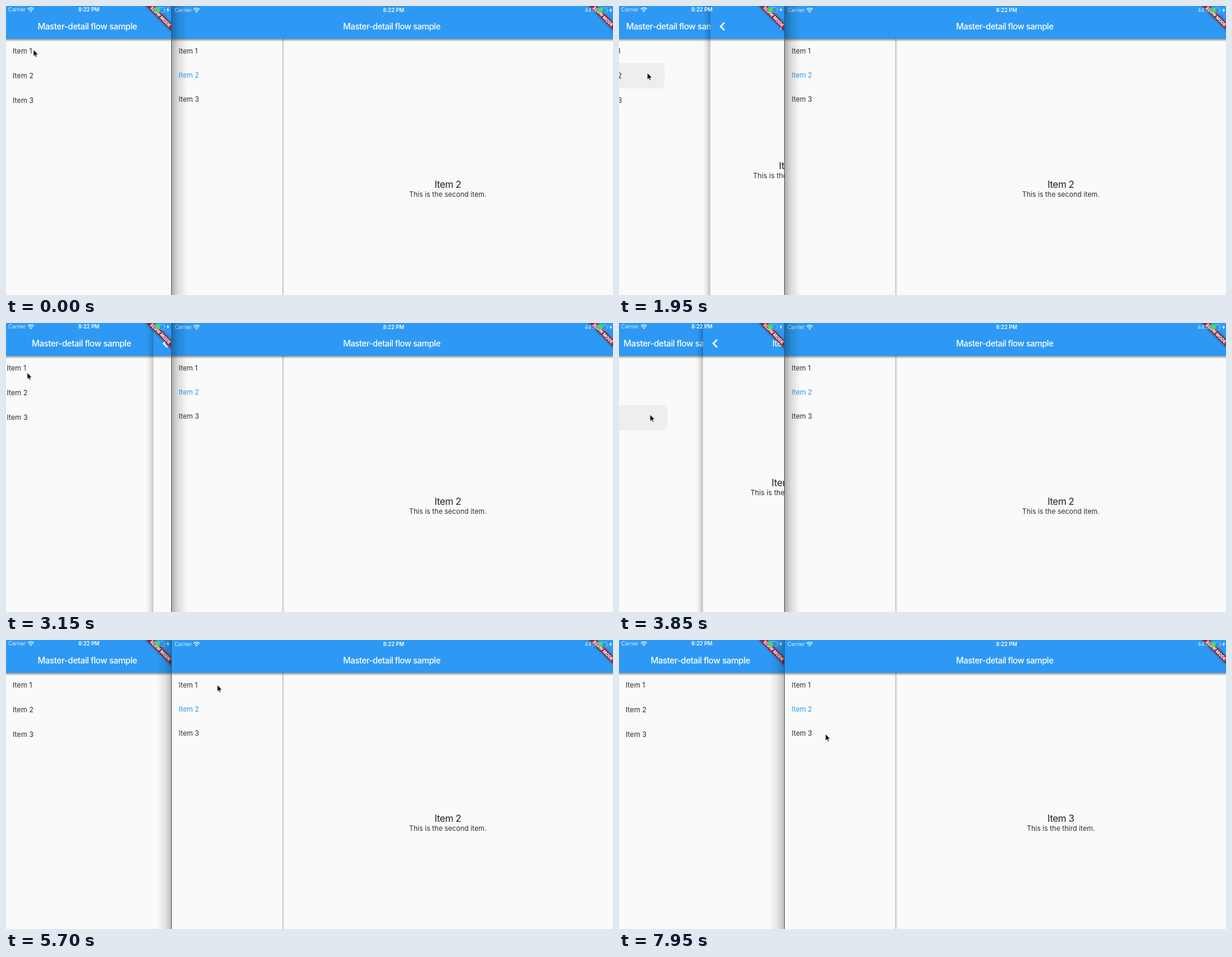
An HTML page that plays this animation: 1007 by 480 pixels, repeating every 8000 ms.

```html
<!DOCTYPE html>
<html lang="en">
<head>
<meta charset="utf-8">
<title>Master-detail flow sample</title>
<style>
@property --push { syntax: "<number>"; inherits: true; initial-value: 0; }

html, body { margin: 0; width: 100%; height: 100%; overflow: hidden; background: #fafafa; }
body > svg { display: block; width: 1007px; height: 480px; font-family: Inter, Roboto, sans-serif; }

.bg { fill: #fafafa; }
.bar { fill: #2d99f4; }
.row, .body { font-size: 11.7px; letter-spacing: .03px; fill: #2e2e2e; }
.head { font-size: 16.2px; letter-spacing: -.4px; fill: #242424; }
.title { font-size: 14.2px; font-weight: 500; letter-spacing: -.44px; fill: #fff; }
.head, .body, .title, .clock, .band text { text-anchor: middle; }
.tablet .row, .tablet .body { font-size: 11.42px; }
.tablet .head { font-size: 15.8px; }
.tablet .title { font-size: 13.9px; }
.status { font-size: 8.7px; fill: #e3f1fe; }
.clock { font-size: 8.7px; font-weight: 600; fill: #fff; }
.band rect { fill: #8f2638; filter: drop-shadow(0 0 2px #0006); }
.band text { font-size: 7.2px; font-weight: 800; fill: #fff; }

/* Page transition: the page slides in, the list below moves a third as far */
.phone { animation: push 8s cubic-bezier(0, 0, .58, 1) infinite; }
.list { transform: translateX(calc(var(--push) * -91.4px)); }
.page { transform: translateX(calc((1 - var(--push)) * 274px)); }
.edge { opacity: calc(var(--push) * 8); }
@keyframes push {
  0%, 1.25% { --push: 0; }
  10%, 13.41% { --push: 1; }
  20.29%, 21.75% { --push: 0; }
  30.5%, 34.375% { --push: 1; }
  41.25%, 45.2% { --push: 0; }
  53.95%, 57.375% { --push: 1; }
  64.25%, 100% { --push: 0; }
}

/* Texts and shadows that switch at once */
.p1, .p2, .p3, .t1, .t2, .t3, .front, .back { animation: 8s step-end infinite; opacity: 0; }
.p1 { animation-name: p1; }
.p2 { animation-name: p2; }
.p3 { animation-name: p3; }
.t1 { animation-name: t1; }
.t2 { animation-name: t2; }
.t3 { animation-name: t3; }
.front { animation-name: front; }
.back { animation-name: back; }
@keyframes p1 { 0% { opacity: 1; } 21%, 100% { opacity: 0; } }
@keyframes p2 { 0% { opacity: 0; } 21% { opacity: 1; } 43%, 100% { opacity: 0; } }
@keyframes p3 { 0% { opacity: 0; } 43%, 100% { opacity: 1; } }
@keyframes t1 { 0% { opacity: 0; } 73.125% { opacity: 1; } 87.5%, 100% { opacity: 0; } }
@keyframes t2 { 0% { opacity: 1; } 73.125% { opacity: 0; } 87.5% { opacity: 1; } 98.75%, 100% { opacity: 0; } }
@keyframes t3 { 0% { opacity: 0; } 98.75%, 100% { opacity: 1; } }
@keyframes front { 0% { opacity: 1; } 66.875%, 100% { opacity: 0; } }
@keyframes back { 0% { opacity: 0; } 66.875%, 100% { opacity: 1; } }

/* Selected row */
.tablet .s1 { animation: s1 8s linear infinite; }
.tablet .s2 { animation: s2 8s linear infinite; }
@keyframes s1 { 0%, 73% { fill: #2e2e2e; } 77%, 87.5% { fill: #2d99f0; } 91.5%, 100% { fill: #2e2e2e; } }
@keyframes s2 { 0%, 73% { fill: #2d99f0; } 77%, 87.5% { fill: #2e2e2e; } 91.5%, 100% { fill: #2d99f0; } }

/* Touch ripples */
.splash, .tap {
  opacity: 0; transform-box: fill-box; transform-origin: center;
  animation: splash 8s linear var(--at) infinite;
}
.splash { fill: #0000000c; }
.tap { fill: #ffffff29; animation-name: tap; }
@keyframes splash {
  0% { transform: scale(0); opacity: 1; }
  6.25% { transform: scale(1); opacity: 1; }
  9%, 100% { transform: scale(1.3); opacity: 0; }
}
@keyframes tap {
  0% { transform: scale(.2); opacity: 1; }
  1.5%, 2.5% { transform: none; opacity: 1; }
  4.3%, 100% { transform: none; opacity: 0; }
}

.cursor { animation: move 8s ease-in-out infinite; }
@keyframes move {
  0%, 2.5% { transform: translate(45.5px, 72.5px); }
  8.75% { transform: translate(22px, 40px); }
  12.5%, 15.625% { transform: translate(20.5px, 42px); }
  20%, 23% { transform: translate(47px, 115px); }
  31.875% { transform: translate(45.5px, 35px); }
  33.5%, 36.9% { transform: translate(24px, 35px); }
  42.5%, 48.125% { transform: translate(51.5px, 152px); }
  54.4%, 61.5% { transform: translate(24px, 27.5px); }
  63.75% { transform: translate(290px, 60px); }
  67.5%, 78.1% { transform: translate(350.5px, 74.5px); }
  83.1%, 90% { transform: translate(345px, 118px); }
  95%, 100% { transform: translate(342.5px, 156px); }
}
</style>
</head>
<body>
<svg viewBox="0 0 1007 480">
  <defs>
    <linearGradient id="down" x2="0" y2="1">
      <stop stop-opacity=".5"/><stop offset=".4" stop-opacity=".2"/><stop offset="1" stop-opacity="0"/>
    </linearGradient>
    <linearGradient id="right">
      <stop stop-opacity=".3"/><stop offset=".4" stop-opacity=".12"/><stop offset="1" stop-opacity="0"/>
    </linearGradient>
    <linearGradient id="left">
      <stop stop-opacity="0"/><stop offset=".55" stop-opacity=".09"/><stop offset="1" stop-opacity=".25"/>
    </linearGradient>
    <g id="wifi" fill="none" stroke="#fff" stroke-width="1.4">
      <path d="M36.3 4.9a6.9 6.9 0 0 1 9.8 0M38 7a4.4 4.4 0 0 1 6.4 0"/>
      <path d="M41.2 10.3l-1.7-1.8a2.5 2.5 0 0 1 3.4 0z" fill="#fff" stroke="none"/>
    </g>
    <g id="battery">
      <rect x="246" y="2.5" width="16.5" height="8" rx="2" fill="none" stroke="#fff" stroke-opacity=".45" stroke-width=".8"/>
      <rect x="247" y="3.3" width="8.6" height="6.5" rx="1.5" fill="#4cd964"/>
      <path d="M263.4 5v3a1.6 1.6 0 0 0 0-3z" fill="#fff" fill-opacity=".45"/>
      <path d="M269.6 2.4l-3.4 4.4h2.2l-.8 3.5 3.4-4.6h-2.2z" fill="#fff"/>
    </g>
    <g id="band" class="band">
      <rect x="-32" y="20.5" width="64" height="8.8"/>
      <text y="27.5">SLOW MODE</text>
    </g>
  </defs>

  <g class="tablet">
    <rect class="bg" width="1007" height="480"/>
    <rect x="458.5" y="54" width="3.5" height="426" fill="url(#right)"/>
    <svg x="275" y="54.4" width="184" height="40.1"><circle class="splash" cx="75" cy="20" r="140" style="--at:5.8s"/></svg>
    <svg x="275" y="94.5" width="184" height="40.1"><circle class="splash" cx="70" cy="24" r="140" style="--at:6.95s"/></svg>
    <text class="row s1" x="286.5" y="78.6">Item 1</text>
    <text class="row s2" x="286.5" y="118.6">Item 2</text>
    <text class="row" x="286.5" y="158.7">Item 3</text>
    <g class="t1"><text class="head" x="733" y="301.8">Item 1</text><text class="body" x="733" y="316.6">This is the first item.</text></g>
    <g class="t2"><text class="head" x="733" y="301.8">Item 2</text><text class="body" x="733" y="316.6">This is the second item.</text></g>
    <g class="t3"><text class="head" x="733" y="301.8">Item 3</text><text class="body" x="733" y="316.6">This is the third item.</text></g>
    <rect class="bar" x="275" width="732" height="54.6"/>
    <rect x="275" y="54.6" width="732" height="5" fill="url(#down)"/>
    <text class="title" x="640" y="39.4">Master-detail flow sample</text>
    <use href="#band" transform="translate(1008) rotate(45) scale(.98)"/>
    <text class="status" x="279.5" y="10.3">Carrier</text>
    <use href="#wifi" x="275" y=".8"/>
    <text class="clock" x="643" y="10.3">8:22 PM</text>
    <text class="status" x="960" y="10.3">44%</text>
    <use href="#battery" x="734.5" y=".8"/>
  </g>

  <svg class="phone" width="275" height="480">
    <g class="list">
      <rect class="bg" width="367" height="480"/>
      <svg y="54.5" width="275" height="41"><circle class="splash" cx="45" cy="19" r="140" style="--at:.06s"/></svg>
      <svg y="95.5" width="275" height="41"><circle class="splash" cx="47" cy="20" r="140" style="--at:1.7s"/></svg>
      <svg y="136.5" width="275" height="41"><circle class="splash" cx="50" cy="16" r="140" style="--at:3.58s"/></svg>
      <text class="row" x="11" y="79.2">Item 1</text>
      <text class="row" x="11" y="120.2">Item 2</text>
      <text class="row" x="11" y="161.2">Item 3</text>
      <rect class="bar" width="367" height="54.6"/>
      <rect y="54.6" width="367" height="5" fill="url(#down)"/>
      <text class="title" x="135" y="39">Master-detail flow sample</text>
    </g>
    <g class="page">
      <rect class="edge" x="-12" width="12" height="480" fill="url(#left)"/>
      <rect class="bg" width="275" height="480"/>
      <rect class="bar" width="275" height="54.6"/>
      <rect y="54.6" width="275" height="5" fill="url(#down)"/>
      <svg width="275" height="54.6">
        <circle class="tap" cx="21.5" cy="33" r="24.5" style="--at:1.03s"/>
        <circle class="tap" cx="21.5" cy="33" r="24.5" style="--at:2.7s"/>
        <circle class="tap" cx="21.5" cy="33" r="24.5" style="--at:4.55s"/>
      </svg>
      <path d="M23.4 27.6L17 34l6.4 6.4" fill="none" stroke="#fff" stroke-width="2.5"/>
      <g class="p1"><text class="title" x="135" y="39">Item 1</text><text class="head" x="136.5" y="270.6">Item 1</text><text class="body" x="136.5" y="286.2">This is the first item.</text></g>
      <g class="p2"><text class="title" x="135" y="39">Item 2</text><text class="head" x="136.5" y="270.6">Item 2</text><text class="body" x="136.5" y="286.2">This is the second item.</text></g>
      <g class="p3"><text class="title" x="135" y="39">Item 3</text><text class="head" x="136.5" y="270.6">Item 3</text><text class="body" x="136.5" y="286.2">This is the third item.</text></g>
    </g>
    <use href="#band" transform="translate(274) rotate(45)"/>
    <text class="status" x="3.8" y="9.4">Carrier</text>
    <use href="#wifi"/>
    <text class="clock" x="137.6" y="9.4">8:22 PM</text>
    <use href="#battery"/>
  </svg>

  <rect class="front" x="275" width="26" height="480" fill="url(#right)"/>
  <rect class="back" x="250" width="25" height="480" fill="url(#left)"/>
  <rect x="274" width="1" height="54.6" fill="#1d5f98"/>
  <rect x="274" y="54.6" width="1" height="425.4" fill="#555"/>

  <path class="cursor" d="M0 0v11.2l2.5-2.3 1.7 3.8 1.9-.8-1.7-3.7h3.5z" stroke="#fff" stroke-width=".8"/>
</svg>
</body>
</html>
```
